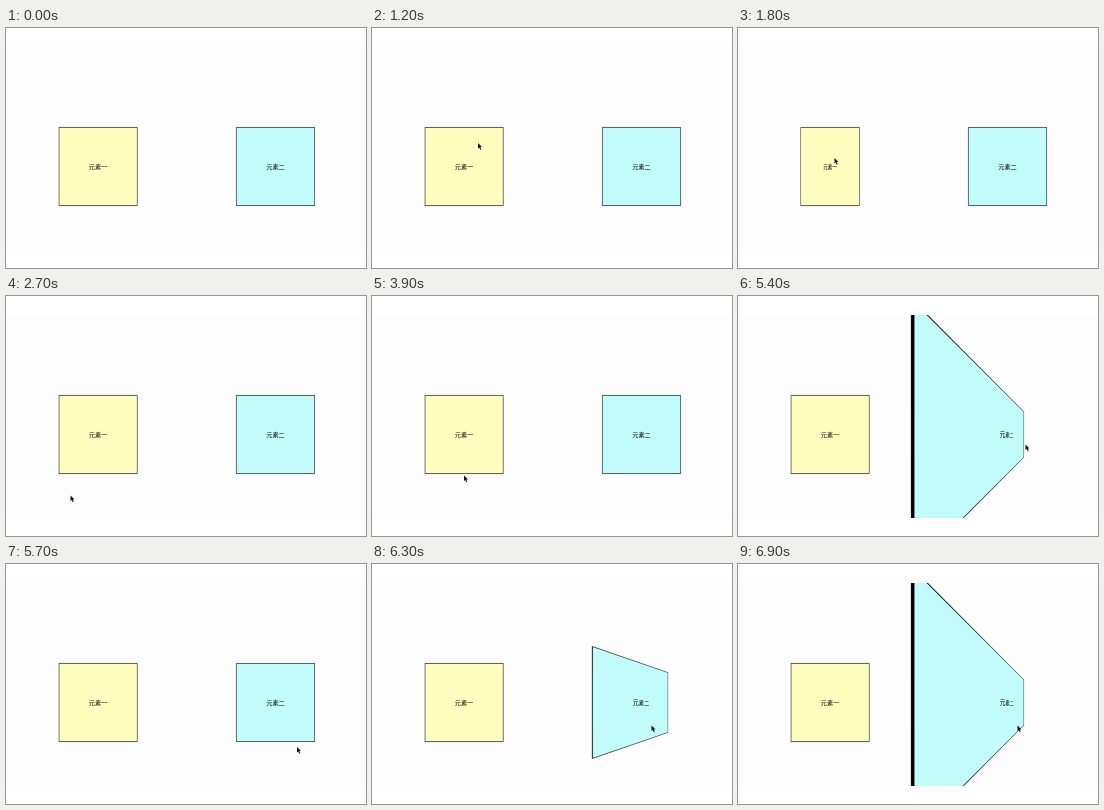
Animation of 360 by 240 pixels, one loop 7.2 s. Source, as an HTML page with a canvas:

```html
<!DOCTYPE html>
<html lang="zh-CN">
<head>
<meta charset="utf-8">
<title>rotateY</title>
<style>
  html, body { margin: 0; width: 100%; height: 100%; overflow: hidden; background: #fff; }
  canvas { display: block; width: 360px; height: 240px; }
</style>
</head>
<body>
<canvas id="stage"></canvas>
<script>
const WIDTH = 360, HEIGHT = 240, LOOP = 7200, STEP = 300, TURN = 660;
const HALF = 39.2, BORDER = .4, GLYPH = 6.2, DEPTH = 38.9;

// Each hover eases into the turn and snaps back at its end.
const boxes = [
  { x: 92.1, y: 138.5, fill: '#fffebf', label: '元素一', bend: 0,
    hovers: [[1364, 2700], [2970, 3900]] },
  { x: 269.5, y: 138.5, fill: '#c1fcfb', label: '元素二', bend: 1 / DEPTH,
    hovers: [[4724, 5700], [6058, LOOP]] }
];

// Key points of the pointer: time, x, y.
const path = [
  [600, 10, 129], [900, 100, 123], [1200, 106, 115], [1800, 96.5, 130], [2100, 97, 132],
  [2700, 64.5, 199.5], [3300, 90, 152], [3900, 92, 179.5], [4200, 112, 193],
  [4800, 280, 155], [5400, 287.5, 148.5], [5700, 291, 183], [6300, 279.5, 161.5]
];
const arrow = new Path2D('M0 0V5.6L1.3 4.5L2.2 6.7L3.2 6.3L2.3 4.1H4Z');

const canvas = document.getElementById('stage');
const ctx = canvas.getContext('2d');
const ratio = window.devicePixelRatio || 1;
canvas.width = WIDTH * ratio;
canvas.height = HEIGHT * ratio;
ctx.scale(ratio, ratio);

// CSS "ease": cubic-bezier(.25, .1, .25, 1)
function ease(x) {
  if (x >= 1) return 1;
  let lo = 0, hi = 1;
  for (let i = 0; i < 24; i++) {
    const s = (lo + hi) / 2;
    if (.75 * s * (1 - s) + s ** 3 < x) lo = s; else hi = s;
  }
  return .3 * lo * (1 - lo) ** 2 + 3 * lo * lo * (1 - lo) + lo ** 3;
}

function turnAmount(hovers, time) {
  const hover = hovers.find(([start, end]) => time > start && time < end);
  return hover ? ease((time - hover[0]) / TURN) : 0;
}

function drawBox(box, time) {
  const amount = turnAmount(box.hovers, time);
  const angle = amount * Math.PI / 4;
  const cos = Math.cos(angle), sin = Math.sin(angle);
  const zoomAt = u => 1 / (1 + u * sin * box.bend * amount);

  function outline(half) {
    const [left, right] = [zoomAt(-half), zoomAt(half)];
    ctx.beginPath();
    ctx.moveTo(-half * cos * left, -half * left);
    ctx.lineTo(half * cos * right, -half * right);
    ctx.lineTo(half * cos * right, half * right);
    ctx.lineTo(-half * cos * left, half * left);
    ctx.closePath();
  }

  ctx.save();
  ctx.translate(box.x, box.y);
  outline(HALF);
  ctx.fillStyle = ctx.strokeStyle = '#000';
  ctx.lineWidth = .25;
  ctx.fill();
  ctx.stroke();
  outline(HALF - BORDER);
  ctx.fillStyle = box.fill;
  ctx.fill();

  ctx.fillStyle = '#000';
  ctx.font = `500 ${GLYPH}px "Noto Sans CJK SC", "Noto Sans CJK", sans-serif`;
  ctx.textAlign = 'center';
  [...box.label].forEach((glyph, i) => {
    const u = (i - 1) * GLYPH, zoom = zoomAt(u);
    ctx.save();
    ctx.translate(u * cos * zoom, 0);
    ctx.scale(cos * zoom * zoom, zoom);
    ctx.fillText(glyph, 0, GLYPH * .42);
    ctx.restore();
  });
  ctx.restore();
}

function drawPointer(time) {
  if (time < path[0][0]) return;
  const next = path.findIndex(point => point[0] > time);
  const [t1, x1, y1] = path.at(next < 0 ? -1 : next);
  const [t0, x0, y0] = path.at(next < 0 ? -1 : next - 1);
  const k = t1 > t0 ? (time - t0) / (t1 - t0) : 0;
  ctx.save();
  ctx.translate(x0 + (x1 - x0) * k, y0 + (y1 - y0) * k);
  ctx.fillStyle = '#111';
  ctx.fill(arrow);
  ctx.restore();
}

function draw(now) {
  const time = Math.floor(now % LOOP / STEP) * STEP;
  ctx.fillStyle = '#fff';
  ctx.fillRect(0, 0, WIDTH, HEIGHT);
  ctx.save();
  ctx.beginPath();
  ctx.rect(0, 19, WIDTH, 203);
  ctx.clip();
  ctx.fillStyle = '#fdfdfd';
  ctx.fillRect(0, 0, WIDTH, HEIGHT);
  boxes.forEach(box => drawBox(box, time));
  drawPointer(time);
  ctx.restore();
}

const begin = performance.now();
function tick() {
  draw(performance.now() - begin);
  requestAnimationFrame(tick);
}
tick();
</script>
</body>
</html>
```
